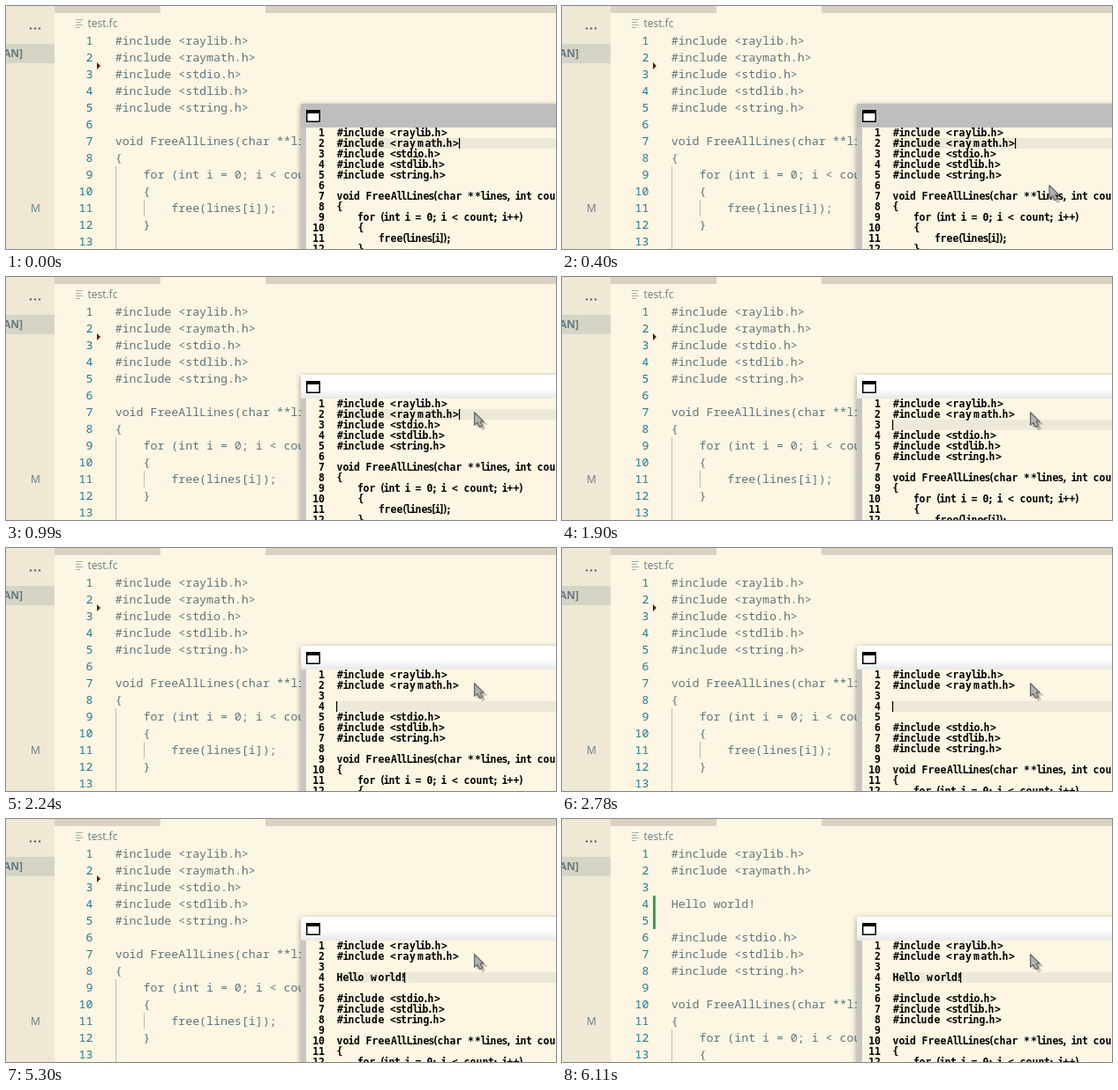
Recreate the animation shown at these times as an HTML page. Size 623 by 276 pixels, loop 8 s.

```html
<!DOCTYPE html>
<html lang="en">
<head>
<meta charset="utf-8">
<title>Live editing</title>
<style>
  html, body { margin: 0; width: 100%; height: 100%; overflow: hidden; background: #fdf6e3; }
  svg { display: block; width: 623px; height: 276px; }
  text { white-space: pre; }
  .ui { font-family: "Open Sans", sans-serif; fill: #657b83; }
  .left { font: 13.25px "Noto Sans Mono", monospace; fill: #5f747b; }
  .left .num { fill: #237893; text-anchor: end; }
  .right { font: bold 11.5px "DejaVu Sans Mono", monospace; fill: #000; }
  .right .num { text-anchor: end; }
  .right .code { text-anchor: middle; }
</style>
</head>
<body>
<svg viewBox="0 0 623 276" xmlns="http://www.w3.org/2000/svg">
  <defs>
    <filter id="blur" x="-20%" y="-20%" width="140%" height="140%"><feGaussianBlur stdDeviation="3"/></filter>
    <linearGradient id="shade" x2="0" y2="1">
      <stop offset="0" stop-color="#000" stop-opacity="0"/>
      <stop offset="1" stop-color="#000" stop-opacity=".09"/>
    </linearGradient>
    <clipPath id="body"><rect x="334" y="138" width="289" height="138"/></clipPath>
  </defs>

  <!-- back editor -->
  <rect width="623" height="276" fill="#fdf6e3"/>
  <path d="M55 0H175V8H55zM294 0H623V8H294z" fill="#d9d2c0"/>
  <rect width="55" height="276" fill="#eee8d5"/>
  <rect y="43" width="55" height="22" fill="#d6d4c5"/>
  <g fill="#586e75"><circle cx="28" cy="25.5" r="1.2"/><circle cx="33" cy="25.5" r="1.2"/><circle cx="38" cy="25.5" r="1.2"/></g>
  <text class="ui" x="-3" y="58" font-size="12" font-weight="700" fill="#4d5f68">AN]</text>
  <text class="ui" x="28" y="234" font-size="12">M</text>
  <path d="M79 15.5H87M79 18.5H85M79 21.5H87M79 24.5H84" stroke="#a5afa9" fill="none"/>
  <text class="ui" x="92.5" y="24" font-size="12">test.fc</text>
  <g id="back" class="left"></g>
  <path id="removed" d="M103 64L107 68L103 72z" fill="#5c1a10"/>
  <rect id="added" x="103" y="87" width="3" height="38" fill="#48985d"/>

  <!-- front window -->
  <rect x="334" y="113" width="310" height="190" fill="#000" opacity=".4" filter="url(#blur)"/>
  <rect x="334" y="111" width="289" height="165" fill="#fdf6e3"/>
  <rect x="334" y="138" width="6" height="138" fill="#c6c6c6"/>
  <rect id="bar" x="334" y="111" width="289" height="27"/>
  <rect id="barShade" x="334" y="126" width="289" height="12" fill="url(#shade)"/>
  <rect x="340.75" y="118.75" width="14.5" height="12.5" fill="#fff" stroke="#000" stroke-width="1.5"/>
  <rect x="340" y="118" width="16" height="4" fill="#000"/>
  <g clip-path="url(#body)">
    <rect id="band" x="374" width="249" height="12" fill="#eee8d9"/>
    <g id="front" class="right"></g>
    <rect id="caret" width="1.2" height="12" fill="#000"/>
  </g>

  <g id="mouse">
    <path d="M3 4V18L6.4 16L9.2 21L13 19.4L11 14.6H16z" fill="#000" opacity=".22"/>
    <path d="M.6 .7V15.2L4 12.4L6.6 17.6L9.6 16.2L7.2 11.2H11.2z" fill="#b4b4b4" stroke="#6a6a6a" stroke-width="1.3" stroke-linejoin="round"/>
  </g>
</svg>
<script>
const LOOP = 8000, START = 374.5;
const $ = id => document.getElementById(id);
const head = ['#include <raylib.h>', '#include <raymath.h>'];
const tail = [
  '#include <stdio.h>', '#include <stdlib.h>', '#include <string.h>', '',
  'void FreeAllLines(char **lines, int count)', '{',
  '    for (int i = 0; i < count; i++)', '    {',
  '        free(lines[i]);', '    }', ''
];
const greeting = 'Hello world!';
const keyTimes = [3480, 3580, 3720, 3820, 3990, 4190, 4420, 4490, 4660, 4745, 4830, 5300];

// proportional advances of the front editor's font
const groups = { '!': 3, '.[](),;': 4, 'ils': 5, ' tf': 6, '#<>dyA*': 8, 'mw': 10 };
const advance = ch => {
  for (const set in groups) if (set.includes(ch)) return groups[set];
  return 7;
};
const widthOf = str => [...str].reduce((sum, ch) => sum + advance(ch), 0);

function addText(parent, str, x, y, cls) {
  const el = document.createElementNS('http://www.w3.org/2000/svg', 'text');
  el.setAttribute('class', cls);
  el.setAttribute('x', x);
  el.setAttribute('y', y);
  el.textContent = str;
  parent.append(el);
}

function addGuide(parent, x, y, h) {
  const el = document.createElementNS('http://www.w3.org/2000/svg', 'rect');
  for (const [k, v] of Object.entries({ x, y, width: 1, height: h, fill: '#bfbdae' })) el.setAttribute(k, v);
  parent.append(el);
}

function drawBack(lines) {
  const g = $('back'), pitch = 18.95, step = 7.95;
  g.replaceChildren();
  const open = lines.indexOf('{');
  lines.slice(0, 13).forEach((line, i) => {
    const y = Math.round(44.2 + i * pitch), top = Math.round(30.5 + i * pitch);
    const code = line.trimStart(), indent = line.length - code.length;
    if (i > open) addGuide(g, 124, top, 19);
    if (indent > 4) addGuide(g, 156, top, 19);
    addText(g, i + 1, 98.5, y, 'num');
    if (code) addText(g, code, 123.7 + indent * step, y, 'code');
  });
}

function drawFront(lines) {
  const g = $('front');
  g.replaceChildren();
  lines.slice(0, 12).forEach((line, i) => {
    const y = 148 + i * 12;
    addText(g, i + 1, 361, y, 'num');
    const code = line.trimStart();
    if (!code) return;
    let x = START + widthOf(line.slice(0, line.length - code.length));
    const centers = [...code].map(ch => {
      const w = advance(ch);
      x += w;
      return x - w / 2;
    });
    addText(g, code, centers.join(' '), y, 'code');
  });
}

function editState(t) {
  const typed = greeting.slice(0, keyTimes.filter(k => t >= k).length);
  if (t < 1900) return { mid: [], row: 1, before: head[1] };
  if (t < 2240) return { mid: [''], row: 2, before: '' };
  if (t < 2540) return { mid: ['', ''], row: 3, before: '' };
  if (t < 2780) return { mid: ['', ''], row: 2, before: '' };
  return { mid: ['', typed, ''], row: 3, before: typed };
}

function placeMouse(t) {
  const m = $('mouse');
  m.style.display = t < 270 ? 'none' : '';
  const p = Math.min(9, Math.max(0, Math.floor((t - 270) / 41.1))) / 9;
  const rest = (1 - p) ** 2;
  const x = t < 810 ? 531 + 46 * rest : 530;
  const y = t < 810 ? 155 + 108 * rest : 153;
  m.setAttribute('transform', `translate(${x} ${y})`);
}

let frontKey, backKey;
function render(t) {
  const { mid, row, before } = editState(t);
  const key = mid.join('\n') + mid.length;
  if (key !== frontKey) drawFront([...head, ...mid, ...tail]);
  frontKey = key;

  const saved = t >= 5870;
  if (saved !== backKey) drawBack([...head, ...(saved ? ['', greeting, ''] : []), ...tail]);
  backKey = saved;

  const top = 138 + row * 12;
  $('band').setAttribute('y', top);
  $('caret').setAttribute('y', top);
  $('caret').setAttribute('x', START + widthOf(before) - .5);
  $('bar').setAttribute('fill', t < 950 ? '#bebebe' : t < 990 ? '#e2e2e2' : '#fff');
  $('barShade').style.display = t < 950 ? 'none' : '';
  $('removed').style.display = t < 6110 ? '' : 'none';
  $('added').style.display = t < 6110 ? 'none' : '';
  placeMouse(t);
}

const begin = performance.now();
function tick() {
  render((performance.now() - begin) % LOOP);
  requestAnimationFrame(tick);
}
tick();
</script>
</body>
</html>
```
